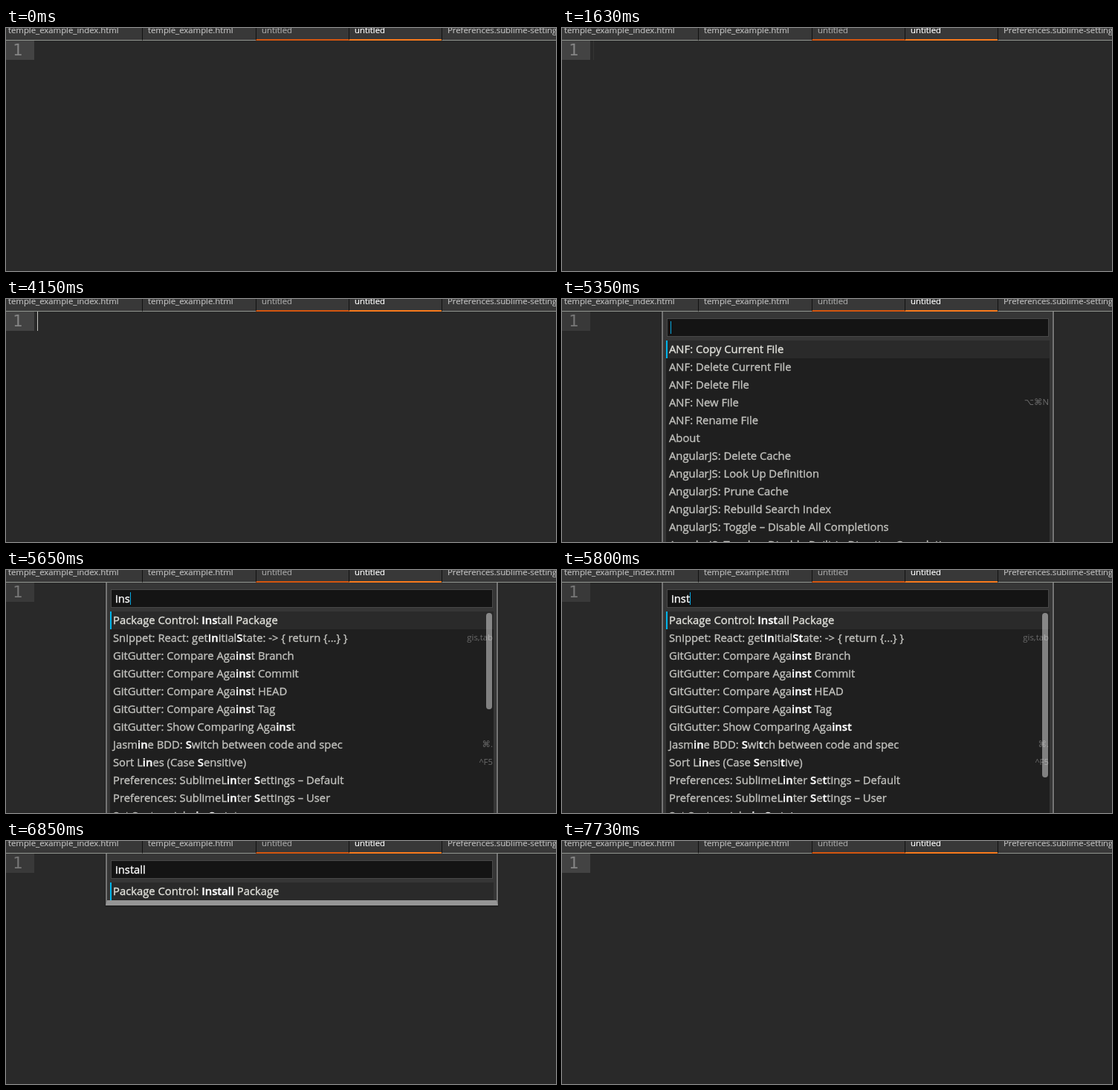
An HTML page for the animation above (8 s loop, 740x328 px).

```html
<!DOCTYPE html>
<html lang="en">
<head>
<meta charset="utf-8">
<title>Command palette</title>
<style>
  html, body { margin: 0; width: 100%; height: 100%; overflow: hidden; background: #292929; }
  #stage { position: relative; width: 740px; height: 328px; overflow: hidden; background: #292929;
    font: 14.8px "Open Sans", "Noto Sans", sans-serif; white-space: pre; -webkit-text-stroke: .35px; }
  #stage div { position: absolute; box-sizing: border-box; }
  #tabs { left: 0; top: 0; width: 740px; height: 17px; background: #383838; overflow: hidden; }
  .tab { top: 0; height: 17px; border-bottom: 1px solid #929690; border-left: 1px solid #111;
    font-size: 11.35px; line-height: 15px; color: #bcbcbc; overflow: hidden; -webkit-text-stroke: .2px; }
  .tab span { position: absolute; left: 7px; top: -5px; }
  .tab.dirty { border-bottom: 2px solid #d4560f; color: #a6a6a6; }
  .tab.active { border-bottom: 2px solid #f97a1c; color: #fff; }
  #gutter { left: 0; top: 17px; width: 38px; height: 26px; background: #434343; color: #858585;
    font: 22px/26px "DejaVu Sans Mono", monospace; padding-left: 9px; -webkit-text-stroke: 0; }
  #gutter.blur { background: #393939; color: #777; }
  #caret { left: 42px; top: 17px; width: 1px; height: 26px; background: #c4c4c0; }
  #panel { left: 134px; top: 17px; width: 528px; background: #363636; border: solid #747474;
    border-width: 0 2px 7px; border-bottom-color: #959595; box-shadow: 0 1px 0 1px #222; }
  #input { left: 5px; top: 9px; width: 514px; height: 25px; background: #141414;
    border: 1px solid #484848; color: #fff; line-height: 23px; padding-left: 5px; }
  #type { left: 10px; top: 13px; width: 1px; height: 17px; background: #08a8e0; }
  #list { left: 4px; top: 39px; width: 516px; background: #1f1f1f; overflow: hidden; }
  .row { left: 0; width: 516px; height: 24px; line-height: 22px; padding-left: 4px; color: #c2c2be; }
  .row.first { background: #2a2a2a; color: #e2e2dc; border-left: 2px solid #00b4ea; padding-left: 2px; }
  .row b { color: #fff; font-weight: 600; }
  .row i { position: absolute; right: 1px; top: 0; color: #6c6c6c; -webkit-text-stroke: 0;
    font: 11.4px/22px "Open Sans", "DejaVu Sans", sans-serif; }
  #bar { left: 510px; top: 41px; width: 8px; border-radius: 4px; background: rgba(255, 255, 255, .44); }
</style>
</head>
<body>
<div id="stage">
  <div id="tabs"></div>
  <div id="gutter">1</div>
  <div id="caret"></div>
  <div id="panel">
    <div id="input"></div>
    <div id="type"></div>
    <div id="list"></div>
    <div id="bar"></div>
  </div>
</div>
<script>
const LOOP = 8000;
const el = id => document.getElementById(id);

// left, width, label, kind
const tabs = [
  [-5, 188, 'temple_example_index.html', ''],
  [183, 153, 'temple_example.html', ''],
  [336, 125, 'untitled', 'dirty'],
  [461, 125, 'untitled', 'active'],
  [586, 160, 'Preferences.sublime-settings', '']
];
el('tabs').innerHTML = tabs.map(([x, w, label, kind]) =>
  `<div class="tab ${kind}" style="left:${x}px;width:${w}px"><span>${label}</span></div>`).join('');

// Asterisks wrap matched letters; a bar precedes the key hint.
const all = [
  'ANF: Copy Current File', 'ANF: Delete Current File', 'ANF: Delete File',
  'ANF: New File|⌥⌘N', 'ANF: Rename File', 'About',
  'AngularJS: Delete Cache', 'AngularJS: Look Up Definition', 'AngularJS: Prune Cache',
  'AngularJS: Rebuild Search Index', 'AngularJS: Toggle – Disable All Completions',
  'AngularJS: Toggle – Disable Built-in Directive Completions'
];
const inst = [
  'Package Control: *Inst*all Package',
  'Snippet: React: get*In*itial*St*ate: -> { return {...} }|gis,tab',
  'GitGutter: Compare Aga*inst* Branch', 'GitGutter: Compare Aga*inst* Commit',
  'GitGutter: Compare Aga*inst* HEAD', 'GitGutter: Compare Aga*inst* Tag',
  'GitGutter: Show Comparing Aga*inst*',
  'Jasm*in*e BDD: *S*wi*t*ch between code and spec|⌘.',
  'Sort L*in*es (Case *S*ensi*t*ive)|^F5',
  'Preferences: SublimeL*in*ter *S*e*t*tings – Default',
  'Preferences: SublimeL*in*ter *S*e*t*tings – User',
  'Set Syntax: Adm*in* *S*crip*t*'
];

// Keeps only the first n matched letters bold.
function trim(row, n) {
  return row.replace(/\*([^*]*)\*/g, (m, s) => {
    const hit = s.slice(0, n);
    n -= hit.length;
    return (hit && `*${hit}*`) + s.slice(hit.length);
  });
}

const insta = [
  'Package Control: *Insta*ll Package', inst[1].replace('*St*ate', '*Sta*te'),
  'GitGutter: Compare Aga*inst* HE*A*D', 'GitGutter: Compare Aga*inst* T*a*g',
  'Jasm*in*e BDD: *S*wi*t*ch between code *a*nd spec|⌘.',
  'Preferences: SublimeL*in*ter *S*e*t*tings – Def*a*ult'
];
const instal = [
  'Package Control: *Instal*l Package',
  'Preferences: SublimeL*in*ter *S*e*t*tings – Def*a*u*l*t'
];

// start, query, rows, scrollbar height
const views = [
  [0, null],
  [4300, '', all, 0],
  [5500, 'in', inst.map(r => trim(r, 2)), 70],
  [5650, 'ins', inst.map(r => trim(r, 3)), 130],
  [5800, 'inst', inst, 222],
  [5950, 'insta', insta, 0],
  [6100, 'instal', instal, 0],
  [6250, 'install', ['Package Control: *Install* Package'], 0],
  [7140, null]
];

// start, caret opacity; the caret belongs to whichever field has focus
const blink = [
  [0, 0], [150, .5], [300, 1], [600, .5], [740, 0],
  [1190, .5], [1340, 1], [1490, .6], [1630, .08],
  [2220, 1], [2520, .5], [2670, 0], [3120, .5], [3260, 1],
  [3560, .5], [3700, 0], [4150, 1], [4600, .5], [4750, 0],
  [5200, .5], [5350, 1], [6700, .5], [6850, 0],
  [7140, 1], [7580, .5], [7730, 0]
];

const at = (steps, t) => steps.findLast(s => s[0] <= t);
const escape = s => s.replace(/&/g, '&amp;').replace(/</g, '&lt;').replace(/>/g, '&gt;');

function rowHtml(row, i) {
  const [label, hint] = row.split('|');
  const text = escape(label).replace(/\*([^*]*)\*/g, '<b>$1</b>');
  return `<div class="row${i ? '' : ' first'}" style="top:${i * 24}px">${text}` +
    (hint ? `<i>${hint}</i>` : '') + '</div>';
}

const pen = document.createElement('canvas').getContext('2d');
pen.font = '14.8px "Open Sans", "Noto Sans", sans-serif';

let shown;
function show(view) {
  if (view === shown) return;
  shown = view;
  const [, query, rows, bar] = view;
  const open = query !== null;
  el('panel').style.display = open ? 'block' : 'none';
  el('gutter').className = open ? 'blur' : '';
  if (!open) return;
  const h = rows.length * 24;
  el('panel').style.height = 39 + h + 7 + 'px';
  el('list').style.height = h + 'px';
  el('list').innerHTML = rows.map(rowHtml).join('');
  el('input').textContent = query;
  el('bar').style.height = bar + 'px';
  el('type').style.left = 10 + Math.round(pen.measureText(query).width + (query ? 1 : 0)) + 'px';
}

function draw() {
  const t = performance.now() % LOOP;
  const view = at(views, t);
  const light = at(blink, t)[1];
  show(view);
  el('caret').style.opacity = view[1] === null ? light : 0;
  el('type').style.opacity = light;
  requestAnimationFrame(draw);
}
draw();
</script>
</body>
</html>
```
